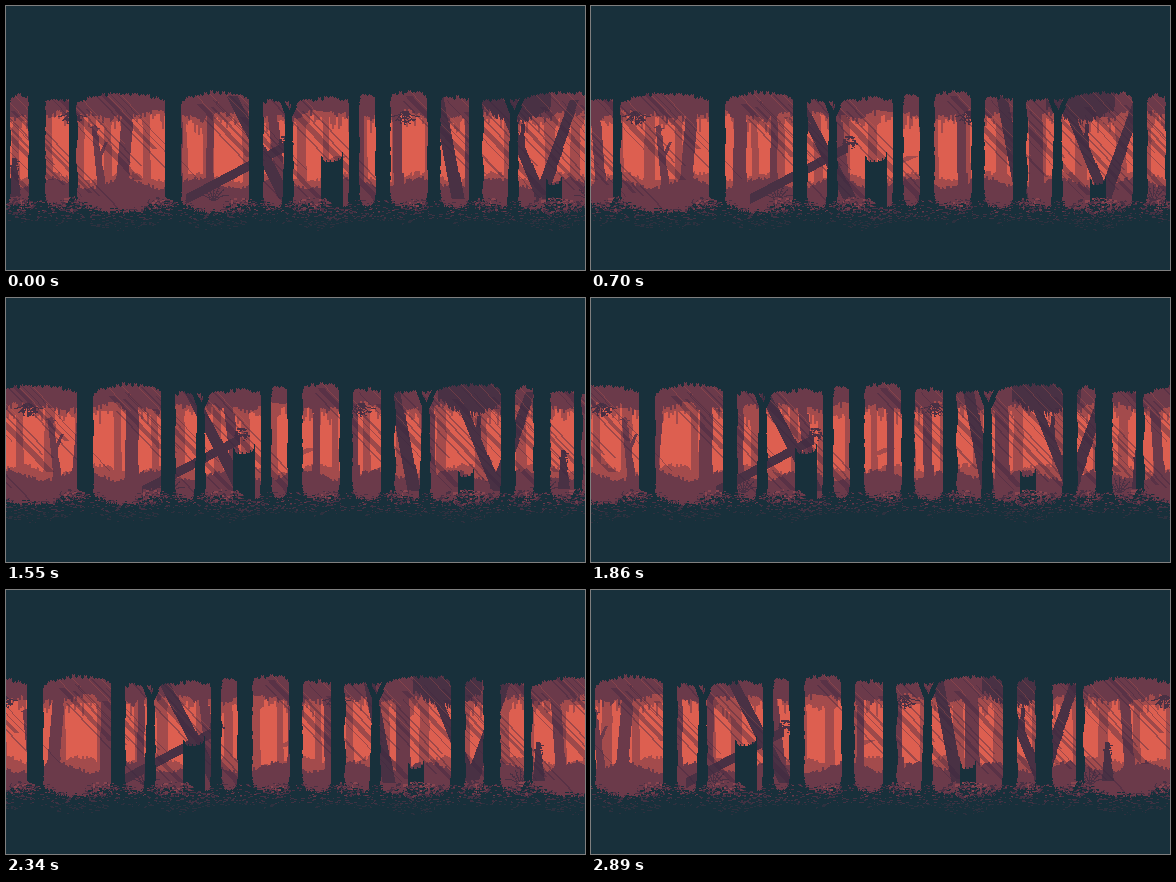
Animation, 579 px wide and 264 px high, one loop 2970 ms. Source, as an HTML page with a canvas:

```html
<!DOCTYPE html>
<html lang="en">
<head>
<meta charset="utf-8">
<title>Forest walk</title>
<style>
html, body { margin: 0; width: 100%; height: 100%; overflow: hidden; background: #18303b; }
canvas { display: block; width: 579px; height: 264px; image-rendering: pixelated; }
</style>
</head>
<body>
<canvas id="stage" width="579" height="264"></canvas>
<script>
const W = 579, H = 264, PERIOD = 593;
const INK = '#18303b', GLOW = '#dd5f50', ROSE = '#a34b4c', PLUM = '#6b3a4a', DUSK = '#493144';

// Length of each step in hundredths of a second
const steps = [...'78888877988878888788788798888788888878'].map(d => d * 10);
const LOOP = steps.reduce((a, b) => a + b);

let seed = 11;
const rnd = () => {
  seed = (seed * 1664525 + 1013904223) >>> 0;
  return seed / 4294967296;
};
const range = (a, b) => a + rnd() * (b - a);

// A strip that repeats sideways; parts crossing its edge wrap round
function strip(speed, paint) {
  const canvas = document.createElement('canvas');
  canvas.width = PERIOD;
  canvas.height = H;
  const c = canvas.getContext('2d');
  const each = (x, draw) => {
    x = Math.round(((x % PERIOD) + PERIOD) % PERIOD);
    draw(x);
    draw(x - PERIOD);
  };
  const pen = {
    rect(x, y, w, h, color) {
      c.fillStyle = color;
      each(x, px => c.fillRect(px, Math.round(y), Math.round(w), Math.round(h)));
    },
    cut(x, y, w, h) {
      each(x, px => c.clearRect(px, Math.round(y), w, Math.round(h)));
    },
    lean(x1, y1, x2, y2, w1, w2, color) {
      for (let y = y1; y <= y2; y++) {
        const u = (y - y1) / (y2 - y1), w = w1 + (w2 - w1) * u;
        pen.rect(x1 + (x2 - x1) * u - w / 2, y, Math.max(1, w), 1, color);
      }
    },
    leaves(x, y, rx, ry, n, color) {
      for (let i = 0; i < n; i++) {
        const a = rnd() * 6.283, r = Math.sqrt(rnd());
        pen.rect(x + Math.cos(a) * rx * r, y + Math.sin(a) * ry * r, range(1, 3), range(1, 2), color);
      }
    },
    fern(x, y, size, dir, color) {
      for (let i = -3; i <= 3; i++) {
        for (let s = 2; s < size; s++) {
          pen.rect(x + i * s * 0.3, y + dir * (s - i * i * s * s / (size * 15)), s % 3 ? 1 : 2, 1, color);
        }
      }
    }
  };
  paint(pen);
  return { canvas, speed };
}

function canopy(pen, base, swing, drip, color) {
  let hang = 0;
  for (let x = 0; x < PERIOD; x++) {
    if (x % 2 === 0) hang = rnd() ** 2 * drip;
    const wave = Math.sin(x * Math.PI * 14 / PERIOD) + 0.5 * Math.sin(x * Math.PI * 38 / PERIOD);
    pen.rect(x, 78, 1, base - 78 + wave * swing + hang, color);
  }
}

function brush(pen, base, swing, color) {
  let up = 0;
  for (let x = 0; x < PERIOD; x++) {
    if (x % 2 === 0) up = rnd() * 4;
    const y = base + swing * Math.sin(x * Math.PI * 16 / PERIOD + 1) - up;
    pen.rect(x, y, 1, 216 - y, color);
  }
}

const far = strip(1.53, pen => {
  canopy(pen, 112, 3, 14, ROSE);
  brush(pen, 173, 4, ROSE);
  for (let x = 10; x < PERIOD; x += range(23, 42)) {
    const w = range(5, 11);
    pen.lean(x, 90, x + range(-3, 3), 190, w, w + 2, ROSE);
  }
  pen.lean(335, 150, 322, 156, 12, 10, ROSE);
});

const middle = strip(2.305, pen => {
  canopy(pen, 107, 3, 7, PLUM);
  brush(pen, 179, 5, PLUM);
  const trunks = [
    [123, 115, 11, PLUM], [170, 170, 12, PLUM], [24, 32, 9, PLUM], [205, 203, 6, PLUM],
    [264, 277, 9, PLUM], [390, 393, 8, PLUM], [432, 452, 11, DUSK], [466, 466, 13, PLUM],
    [355, 354, 6, PLUM]
  ];
  for (const [top, foot, w, color] of trunks) pen.lean(top, 90, foot, 192, w, w + 2, color);

  // Broken tree with stubby branches
  pen.lean(88, 120, 97, 190, 5, 9, PLUM);
  pen.lean(100, 136, 94, 150, 3, 4, PLUM);
  pen.leaves(88, 121, 4, 3, 8, PLUM);

  // Fallen log across a leaning trunk
  pen.lean(226, 90, 280, 192, 11, 14, DUSK);
  for (let x = 180; x < 278; x++) pen.rect(x, 188 - (x - 180) * 0.53, 1, 10, DUSK);
  pen.leaves(279, 136, 7, 7, 50, DUSK);

  // Crossing pair under a dark crown
  for (let x = 476; x < 545; x++) {
    const u = (x - 476) / 69;
    pen.rect(x, 82, 1, 16 + 15 * Math.sin(u * Math.PI) + rnd() * 6, DUSK);
  }
  pen.lean(496, 98, 536, 192, 8, 12, DUSK);
  pen.lean(568, 94, 535, 190, 9, 14, DUSK);
  pen.lean(517, 118, 516, 142, 4, 5, DUSK);

  pen.lean(8, 152, 9, 190, 4, 12, DUSK);
  pen.leaves(8, 160, 5, 8, 18, DUSK);
  for (const x of [65, 398]) {
    pen.fern(x, 103, 16, 1, DUSK);
    pen.leaves(x + 2, 111, 9, 6, 24, DUSK);
  }
  for (const x of [207, 583]) pen.fern(x, 196, 18, -1, DUSK);
});

const rays = strip(4.61, pen => {
  const shade = 'rgba(64,40,67,.4)', light = 'rgba(221,95,80,.24)';
  const beam = (x, y1, y2, w, color) => {
    for (let y = y1; y < y2; y++) pen.rect(x + (y - 85) * 0.95, y, w, 1, color);
  };
  for (const x of [-22, 38, 86, 172, 200, 256, 388, 432, 474, 512, 546]) {
    for (let i = 0, p = x; i < 4; i++) {
      const w = i === 1 ? range(4, 8) : range(1, 3);
      beam(p, 83 + range(0, 30), 212 - range(0, 70), w, shade);
      if (i % 2) beam(p + w + 2, 85, range(105, 150), 1, light);
      p += w + range(2, 7);
    }
  }
});

const front = strip(4.61, pen => {
  // Openings: left, right, top at each side, rise of the arch
  const gaps = [
    [4, 23, 93, 93, 4], [39, 65, 96, 95, 2], [70, 160, 98, 97, 10], [175, 244, 97, 97, 11],
    [257, 283, 96, 97, 2], [283, 344, 99, 94, 4], [353, 370, 91, 91, 3], [384, 422, 92, 91, 6],
    [434, 464, 94, 96, 4], [476, 508, 94, 96, 2], [508, 585, 94, 90, 5]
  ];
  const floor = new Array(PERIOD).fill(198);
  pen.rect(0, 0, PERIOD, H, INK);
  for (const [l, r, a, b, rise] of gaps) {
    let jag = 0;
    for (let x = l; x < r; x++) {
      const u = (x - l) / (r - l), arch = Math.sin(u * Math.PI);
      if (x % 3 === 0) jag = range(-2, 2);
      const top = a + (b - a) * u - rise * Math.sqrt(arch) + jag + (x % 3 === 1 ? 1 : 0);
      const end = 193 + Math.min(13, 4 + (r - l) / 7) * Math.sqrt(arch) + range(-1, 2);
      floor[x] = end;
      pen.cut(x, top, 1, end - top);
    }
  }

  const trunks = [[-3, 14], [31, 17], [67, 8], [167, 16], [250, 14], [348, 10], [377, 15], [428, 13], [470, 14]];
  for (const [x, w] of trunks) {
    for (let y = 84; y < 204; y++) {
      const flare = Math.max(0, 97 - y) * 0.35 + Math.max(0, y - 186) * 0.25;
      const wide = w + flare + Math.sin(y * 0.13 + x);
      pen.rect(x - wide / 2, y, wide, 1, INK);
    }
  }
  for (const x of [283, 508]) {
    pen.lean(x, 106, x - 1, 204, 7, 12, INK);
    pen.lean(x - 9, 88, x, 111, 5, 6, INK);
    pen.lean(x + 10, 88, x, 111, 5, 6, INK);
  }

  // Stumps with splintered tops
  for (const [x, w, top] of [[315, 22, 152], [540, 16, 175]]) {
    for (let i = 0; i < w; i++) {
      const u = Math.abs(i / (w - 1) * 2 - 1);
      const y = top + 4 - 6 * u ** 6 - (i % 4 === 1 ? 2 : 0) - (i > w / 2 ? 2 * u : 0);
      pen.rect(x + i, y, 1, 205 - y, INK);
    }
  }

  // Bushes catching the light
  for (const [x, rx] of [[14, 14], [63, 15], [152, 16], [232, 16], [303, 22], [408, 13], [482, 14], [550, 30]]) {
    pen.leaves(x, 199, rx, 8, rx * 5, DUSK);
    pen.leaves(x, 197, rx, 7, rx * 3, PLUM);
    pen.leaves(x, 196, rx * 0.6, 5, rx * 0.6, '#8a4550');
    pen.leaves(x, 203, rx, 6, rx * 3, INK);
  }
  // Leaf litter thinning downward
  for (let i = 0; i < 1500; i++) {
    const x = Math.floor(rnd() * PERIOD), y = Math.max(194, floor[x] - 4) + rnd() ** 1.4 * 21;
    const color = y < 206 ? (rnd() < 0.25 ? PLUM : DUSK) : y < 213 ? '#413243' : '#2e313f';
    pen.rect(x, y, range(1, 3), 1, rnd() < 0.3 && y < 206 ? INK : color);
  }
});

const ctx = document.getElementById('stage').getContext('2d');

function draw(k) {
  ctx.fillStyle = INK;
  ctx.fillRect(0, 0, W, H);
  ctx.fillStyle = GLOW;
  ctx.fillRect(0, 80, W, 134);
  for (const { canvas, speed } of [far, middle, rays, front]) {
    const x = -Math.round(speed * k);
    ctx.drawImage(canvas, x, 0);
    ctx.drawImage(canvas, x + PERIOD, 0);
  }
}

function stepAt(ms) {
  let k = 0;
  while (k < steps.length - 1 && ms >= steps[k]) ms -= steps[k++];
  return k;
}

let shown = -1;
const start = performance.now();
function tick() {
  const k = stepAt((performance.now() - start) % LOOP);
  if (k !== shown) draw(shown = k);
  requestAnimationFrame(tick);
}
tick();
</script>
</body>
</html>
```
